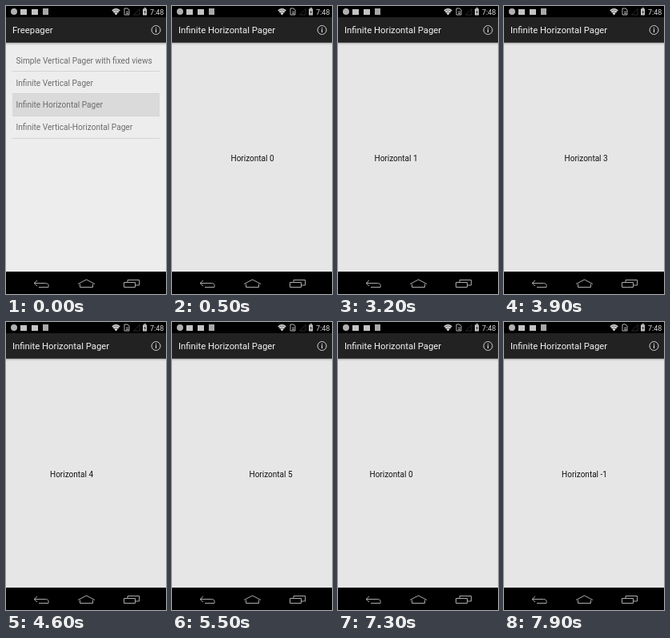
Animation, 200 px wide and 360 px high, one loop 8000 ms. Source, as an HTML page with a canvas:

```html
<!DOCTYPE html>
<html lang="en">
<head>
<meta charset="utf-8">
<title>Pager demo</title>
<style>
  html, body { margin: 0; width: 100%; height: 100%; overflow: hidden; background: #000; }
  canvas { display: block; width: 200px; height: 360px; }
</style>
</head>
<body>
<canvas id="stage"></canvas>
<script>
const W = 200, H = 360, LOOP = 8000, STEP = 100;
const canvas = document.getElementById('stage');
const ratio = window.devicePixelRatio || 1;
canvas.width = W * ratio;
canvas.height = H * ratio;
const ctx = canvas.getContext('2d');
ctx.scale(ratio, ratio);

const ITEMS = [
  'Simple Vertical Pager with fixed views',
  'Infinite Vertical Pager',
  'Infinite Horizontal Pager',
  'Infinite Vertical-Horizontal Pager'
];

// Start time, page reached, steps the finger stays down.
const SWIPES = [
  [2400, 1, 4], [3200, 2, 1], [3700, 3, 1], [4100, 4, 2], [4600, 5, 2],
  [5200, 4.975, 0], [5500, 4, 2], [6000, 3, 1], [6400, 2, 2], [6900, 1, 1],
  [7200, 0, 1], [7600, -1, 1]
];
const FLING_STEPS = 3;

// The finger speeds up slowly; after release the page eases out to its rest.
function swipeProgress(step, dragSteps) {
  const dragged = n => n && 0.14 * n ** 1.5 / dragSteps ** 0.6;
  if (step <= dragSteps) return dragged(step);
  const left = Math.max(0, 1 - (step - dragSteps) / FLING_STEPS);
  return 1 - (1 - dragged(dragSteps)) * left ** 4;
}

function pagePosition(time) {
  let position = 0;
  for (const [start, page, dragSteps] of SWIPES) {
    if (time < start) break;
    const step = Math.floor((time - start) / STEP) + 1;
    position += (page - position) * swipeProgress(step, dragSteps);
  }
  return position;
}

function rect(x, y, w, h, color) {
  ctx.fillStyle = color;
  ctx.fillRect(x, y, w, h);
}

function text(string, x, y, size, color, align = 'left') {
  ctx.font = `${size}px Roboto, sans-serif`;
  ctx.textAlign = align;
  ctx.fillStyle = color;
  ctx.fillText(string, x, y);
}

function stroke(path, color, width = 1) {
  ctx.strokeStyle = color;
  ctx.lineWidth = width;
  ctx.stroke(new Path2D(path));
}

function fill(path, color) {
  ctx.fillStyle = color;
  ctx.fill(new Path2D(path));
}

function drawStatusBar() {
  const light = '#c4c4c4';
  rect(0, 0, W, 14, '#000');
  fill('M6 7a4 4 0 1 0 8 0a4 4 0 1 0 -8 0', '#b0b0b0');
  rect(18, 4, 8, 7, light);
  rect(32, 4, 8, 7, light);
  rect(46, 3, 7, 8, '#a8a8a8');
  fill('M137.5 11.5L132.3 5.2Q137.5 1 142.7 5.2Z', '#ddd');
  stroke('M133.5 6.6Q137.5 3.4 141.5 6.6M135 8.6Q137.5 6.6 140 8.6', '#000', 0.6);
  stroke('M148 3h4l2 2v6h-6zM150 7.5h3M150 9.5h3', light, 0.9);
  stroke('M159.5 11H167V3.5Z', '#3a3a3a', 0.7);
  rect(172.5, 2.2, 2.5, 1.5, light);
  rect(171, 3.5, 5, 8, light);
  fill('M174.3 5l-2 3h1.3l-.5 2.5l2-3.3h-1.2z', '#222');
  text('7:48', 180, 11, 9, '#ddd');
}

function drawActionBar() {
  rect(0, 14, W, 31, '#222');
  ['#444', '#bbb', '#d4d4d4', '#dfdfdf'].forEach((shade, i) => rect(0, 45 + i, W, 1, shade));
  stroke('M182 30a5.5 5.5 0 1 0 11 0a5.5 5.5 0 1 0 -11 0', '#ddd', 0.9);
  rect(187, 27, 1, 1.2, '#eee');
  rect(187, 29, 1, 4, '#eee');
}

function drawNavigationBar() {
  const line = '#aaa';
  rect(0, 332, W, 28, '#000');
  stroke('M39 343L35 346.5L39 350M35.5 346.5H49.5Q54 346.5 53 351.5H41', line);
  stroke('M90 347.5L100.5 342L111 347.5M92.5 347.5V351.5H108.5V347.5', line);
  stroke('M147.5 345.5H161.5V351.5H147.5ZM152 345V342.5H166.5V349H162', line);
}

function drawList() {
  rect(0, 49, W, 283, '#ededed');
  text('Freepager', 8, 34, 11.3, '#f4f4f4');
  rect(8, 109, 184, 28, '#dadada');
  ITEMS.forEach((item, i) => {
    rect(8, 81 + i * 28, 184, 1, '#d4d4d4');
    text(item, 12.5, 72 + i * 27.7, 10.15, '#6c6c6c');
  });
}

function drawPager(position) {
  text(ITEMS[2], 8, 34, 11.3, '#f4f4f4');
  const first = Math.floor(position);
  for (const page of [first, first + 1]) {
    text(`Horizontal ${page}`, W / 2 + 0.5 + (page - position) * W, 193.5, 10, '#111', 'center');
  }
}

function draw(time) {
  rect(0, 0, W, H, '#e6e6e6');
  drawStatusBar();
  drawActionBar();
  const listAlpha = time < 400 ? 1 : time < 500 ? 0.5 : 0;
  if (listAlpha > 0) {
    ctx.globalAlpha = listAlpha;
    drawList();
  }
  if (listAlpha < 1) {
    ctx.globalAlpha = 1 - listAlpha;
    drawPager(pagePosition(time));
  }
  ctx.globalAlpha = 1;
  drawNavigationBar();
}

const origin = performance.now();
function tick() {
  draw((performance.now() - origin) % LOOP);
  requestAnimationFrame(tick);
}
tick();
</script>
</body>
</html>
```
